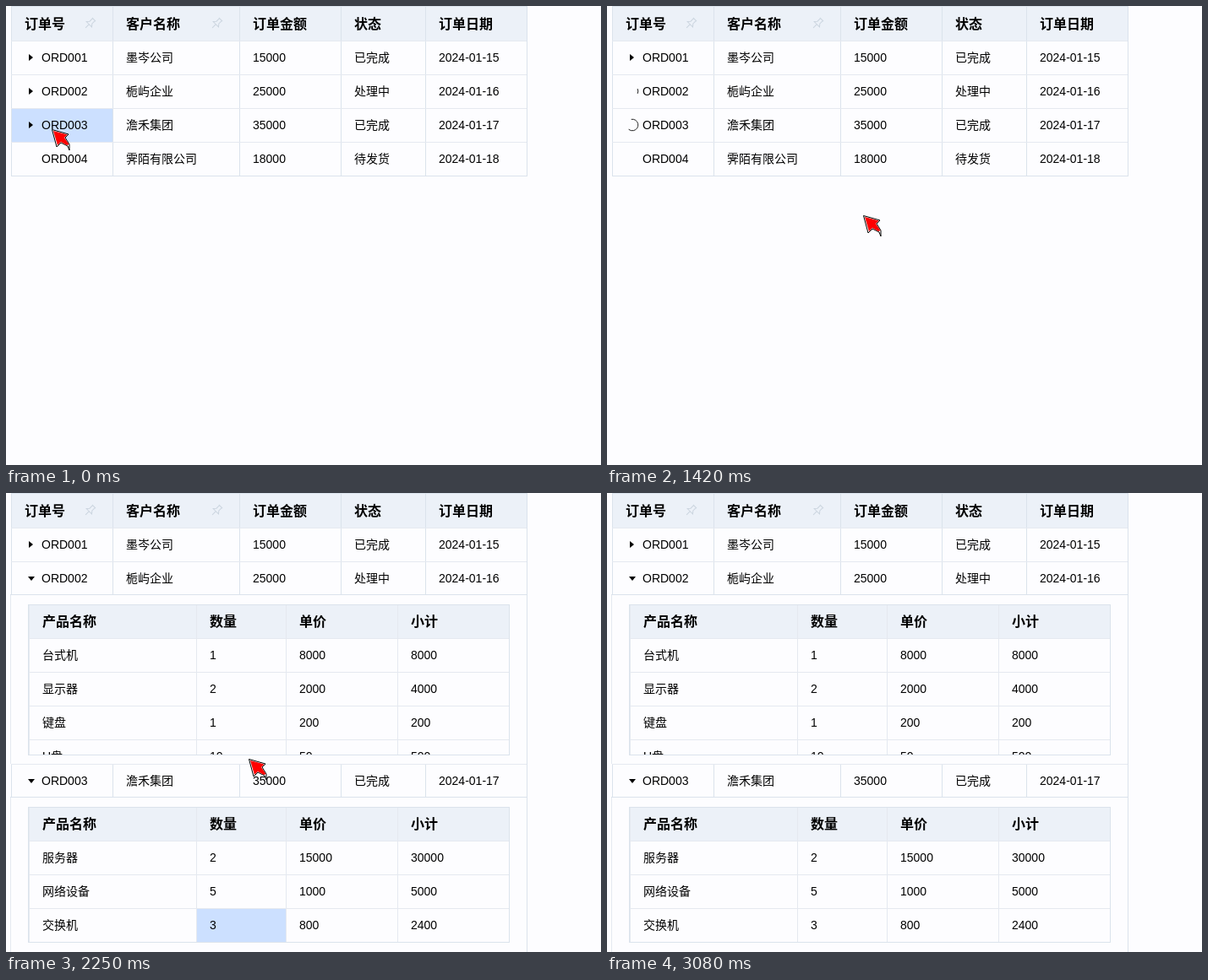
An HTML page with a canvas for the animation above (3.51 s loop, 704 by 544 pixels).

```html
<!DOCTYPE html>
<html lang="zh-CN">
<head>
<meta charset="utf-8">
<style>
html, body { margin: 0; width: 100%; height: 100%; overflow: hidden; background: #fdfdff; }
canvas { display: block; }
</style>
</head>
<body>
<canvas id="stage" width="704" height="544"></canvas>
<script>
const g = document.getElementById('stage').getContext('2d');
const LOOP = 3510, STEP = 250 / 3, LAST = 37, ROW = 40, PANEL = 200;
const FONT = '"Liberation Sans", "Noto Sans CJK SC", "Noto Sans CJK", sans-serif';
const PAGE = '#fdfdff', HEAD = '#ecf1f8', HOVER = '#cce0ff';
const EDGE = '#dbe3ec', GRID = '#e5e9f0', PIN = '#cbd5df';

const outerX = [6, 126, 276, 396, 496, 616];
const innerX = [27, 225, 331, 463, 595];
const outerHead = ['订单号', '客户名称', '订单金额', '状态', '订单日期'];
const innerHead = ['产品名称', '数量', '单价', '小计'];

// load / open are step numbers; arc = [step, start angle, sweep, sweep per step] in degrees
const orders = [
  { cells: ['ORD001', '墨岑公司', '15000', '已完成', '2024-01-15'], load: 99, open: 99 },
  { cells: ['ORD002', '栀屿企业', '25000', '处理中', '2024-01-16'], load: 14, open: 27, arc: [17, -25, 50, 42],
    items: [['台式机', 1, 8000], ['显示器', 2, 2000], ['键盘', 1, 200], ['U盘', 10, 50]] },
  { cells: ['ORD003', '澹禾集团', '35000', '已完成', '2024-01-17'], load: 7, open: 23, arc: [11, -5, 195, 6],
    items: [['服务器', 2, 15000], ['网络设备', 5, 1000], ['交换机', 3, 800]] },
  { cells: ['ORD004', '霁陌有限公司', '18000', '待发货', '2024-01-18'] }
];

// pointer path: step, x, y
const path = [
  [0, 54, 146], [5, 31, 139], [7, 31, 128], [8, 33, 119], [11, 37, 109], [13, 32, 102], [14, 36, 104],
  [16, 230, 215], [17, 303, 248], [21, 310, 251], [24, 293, 276], [26, 288, 304], [27, 287, 315],
  [28, 287, 315], [32, 305, 359], [35, 568, 512], [36, 611, 522], [37, 800, 600]
];

function pointer(k) {
  const i = Math.max(1, path.findIndex(p => p[0] >= k));
  const [a, ax, ay] = path[i - 1], [b, bx, by] = path[i];
  const u = (k - a) / (b - a);
  return [Math.round(ax + (bx - ax) * u), Math.round(ay + (by - ay) * u)];
}

function layout(k) {
  const cells = [], rows = [], panels = [];
  const addRow = (id, xs, texts, y, h, head, indent = 0) => texts.forEach((text, c) =>
    cells.push({ id: id + c, x: xs[c], y, w: xs[c + 1] - xs[c], h, text, head, pad: 16 + (c ? 0 : indent) }));
  addRow('h', outerX, outerHead, 1, ROW + 1, true);
  let y = 42;
  orders.forEach((order, r) => {
    const open = k >= order.open;
    addRow(`${r}:`, outerX, order.cells, y, open ? ROW - 1 : ROW, false, 20);
    rows.push({ order, y });
    y += ROW;
    if (!open) return;
    const top = y + 10, limit = top + 179;
    const lines = [innerHead, ...order.items.map(([name, n, price]) => [name, n, price, n * price])];
    lines.forEach((line, i) => {
      const ly = top + 1 + i * ROW;
      addRow(`${r}.${i}:`, innerX, line, ly, Math.min(ROW, limit - ly), !i);
    });
    panels.push({ top, height: Math.min(limit - 1 - top, lines.length * ROW) });
    y += PANEL;
  });
  return { cells, rows, panels, bottom: y };
}

function box(x, y, w, h, color) {
  g.fillStyle = color;
  g.fillRect(x, y, w, h);
}

function shape(d, fill, stroke) {
  const p = new Path2D(d);
  if (fill) { g.fillStyle = fill; g.fill(p); }
  if (stroke) { g.strokeStyle = stroke; g.lineWidth = 1; g.stroke(p); }
}

function at(x, y, draw) {
  g.save();
  g.translate(x, y);
  draw();
  g.restore();
}

function drawCell({ x, y, w, h, text, head, pad }, hover) {
  g.save();
  g.beginPath();
  g.rect(x, y, w, h);
  g.clip();
  box(x, y, w, h, hover ? HOVER : head ? HEAD : PAGE);
  g.fillStyle = '#000';
  g.font = `${head ? 'bold 16' : '14'}px ${FONT}`;
  g.fillText(text, x + pad, head ? y + h - 15 : y + 24);
  box(x, y, 1, h, outerX.includes(x) ? EDGE : GRID);
  box(x, y + h - 1, w, 1, GRID);
  g.restore();
}

function drawPanel({ top, height }) {
  box(5, top - 12, 612, 1, EDGE);
  box(5, top - 11, 1, PANEL, GRID);
  box(6, top + 189, 611, 1, GRID);
  g.strokeStyle = EDGE;
  g.lineWidth = 1;
  g.strokeRect(26.5, top + .5, 569, height);
}

function drawToggle({ order, y }, k) {
  if (!order.load) return;
  at(30, y + 19, () => {
    if (k >= order.open) shape('M-4 -2H4L0 3Z', '#000');
    else if (k < order.load) shape('M-3 -4L2 0L-3 4Z', '#000');
    else {
      const [base, start, sweep, rate] = order.arc, n = k - base, rad = Math.PI / 180;
      const from = (start + 44 * n) * rad;
      g.beginPath();
      g.arc(0, 0, 6.8, from, from + Math.min(350, Math.max(20, sweep + rate * n)) * rad);
      g.strokeStyle = '#222';
      g.lineWidth = 1;
      g.stroke();
    }
  });
}

function drawPin(x) {
  at(x, 21, () => {
    g.rotate(Math.PI / 4);
    shape('M-3 -7H3M-2 -7V-2L-4.5 1H4.5L2 -2V-7M0 1V7', null, PIN);
  });
}

function drawPointer(x, y) {
  at(x, y, () => {
    shape('M.5 .5L20 6L16 10L21 18V25L19 20L11 16L6 21Z', '#fff', '#000');
    shape('M2 2L18.5 6.5L15 10L20.5 18L18 19L11 15L7 19Z', '#f00');
  });
}

function draw(k) {
  // the highlight stays on its old cell until the pointer moves again
  const seen = k === 27 || k === 28 ? 26 : k;
  const [hx, hy] = pointer(seen);
  const under = layout(seen).cells.find(c => !c.head &&
    hx >= c.x && hx < c.x + c.w && hy >= c.y && hy < c.y + c.h);
  const { cells, rows, panels, bottom } = layout(k);

  box(0, 0, 704, 544, PAGE);
  cells.forEach(c => drawCell(c, under && under.id === c.id));
  panels.forEach(drawPanel);
  box(6, 0, 611, 1, EDGE);
  box(616, 0, 1, bottom, EDGE);
  box(6, bottom - 1, 611, 1, EDGE);
  rows.forEach(row => drawToggle(row, k));
  drawPin(99);
  drawPin(249);
  drawPointer(...pointer(k));
}

const begin = performance.now();
function tick() {
  const t = (performance.now() - begin) % LOOP;
  draw(Math.min(LAST, Math.floor((t + 4) / STEP)));
  requestAnimationFrame(tick);
}
tick();
</script>
</body>
</html>
```
